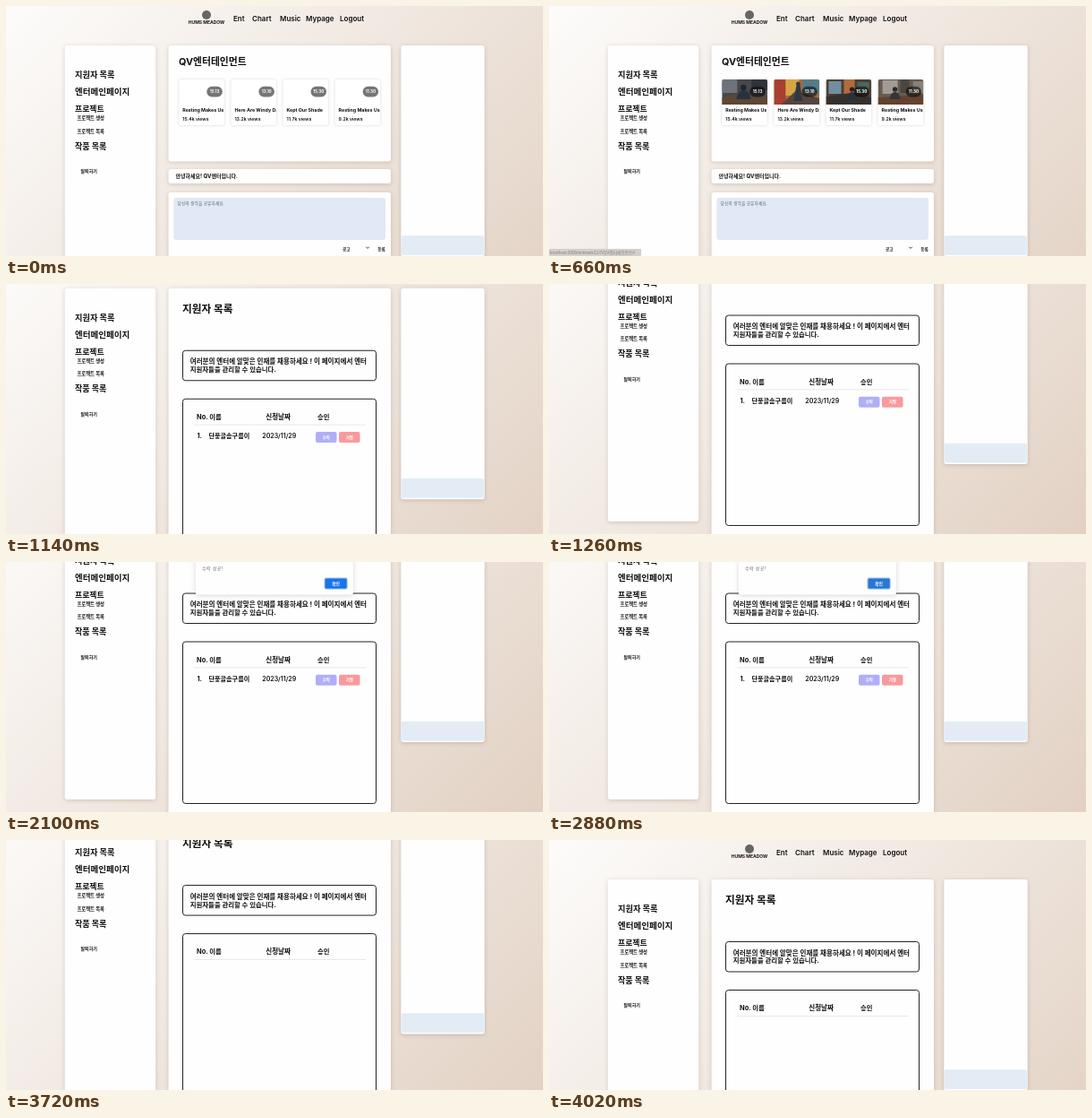
Write an HTML page that moves like this. It is 600x279 px and loops after 4.2 s.

```html
<!DOCTYPE html>
<html lang="ko">
<head>
<meta charset="utf-8">
<title>Applicants</title>
<style>
  html, body { margin: 0; width: 100%; height: 100%; overflow: hidden; background: #efe7e0; }
  svg { display: block; width: 100%; height: 100%; }
  text { font-family: Inter, 'Noto Sans CJK KR', 'Noto Sans CJK JP', sans-serif; font-weight: 700; fill: #111; white-space: pre; }
  .light { font-weight: 400; fill: #666; }
  .latin { font-weight: 600; }
  .white { fill: #fff; }
  .url { font-family: 'Liberation Sans', 'Noto Sans CJK KR', sans-serif; font-weight: 400; fill: #85827f; }
  .panel { fill: #fefefe; filter: drop-shadow(0 1px 2.5px rgba(70, 45, 25, .2)); }
  .card { fill: #fff; filter: drop-shadow(0 .5px 1.5px rgba(0, 0, 0, .16)); }
  .frame { fill: none; stroke: #222; stroke-width: 1; }
</style>
</head>
<body>
<svg id="stage" viewBox="0 0 600 279" preserveAspectRatio="none"></svg>
<script>
const LOOP = 4200, TICK = 60, SCROLL = 78.5, PAGE_H = 358;
const COMPANY = 'QV엔터테인먼트';

const rect = (x, y, w, h, fill, r = 0, extra = '') =>
  `<rect x="${x}" y="${y}" width="${w}" height="${h}" rx="${r}" ${fill ? `fill="${fill}"` : ''} ${extra}/>`;
const box = (cls, x, y, w, h, r = 3) => rect(x, y, w, h, '', r, `class="${cls}"`);
const circle = (x, y, r, fill) => `<circle cx="${x}" cy="${y}" r="${r}" fill="${fill}"/>`;
const path = (d, fill) => `<path d="${d}" fill="${fill}"/>`;
// y is the middle of the line
const text = (x, y, size, str, cls = '', extra = '') =>
  `<text x="${x}" y="${y + size * 0.36}" font-size="${size}" class="${cls}" ${extra}>${str}</text>`;
const centred = (x, y, size, str, cls) => text(x, y, size, str, cls, 'text-anchor="middle"');
const group = (id, body, extra = '') => `<g id="${id}" ${extra}>${body}</g>`;

// thumbnails, each 51 x 28
const scenes = [
  rect(0, 0, 51, 28, '#45474a') + rect(0, 0, 17, 15, '#6d7379') + rect(33, 0, 18, 12, '#30343a') +
    path('M0 28V20L22 15L51 19V28Z', '#5d4737') + circle(24, 9, 3.2, '#22262c') +
    path('M16 22Q18 12 24 12Q31 12 32 22Z', '#28323d'),
  rect(0, 0, 51, 28, '#a9683c') + rect(0, 0, 13, 28, '#a83f30') + rect(13, 0, 15, 18, '#d5a544') +
    rect(32, 0, 19, 16, '#567c8a') + path('M8 28L24 13L51 21V28Z', '#57443c') +
    path('M22 24L25 7L29 6L32 24Z', '#303943') + circle(27, 5, 2.4, '#303943'),
  rect(0, 0, 51, 28, '#4c4037') + rect(3, 2, 14, 14, '#718fa0') + rect(20, 0, 12, 16, '#b36b3c') +
    rect(35, 3, 13, 12, '#48695e') + path('M0 28V19L28 15L51 20V28Z', '#36312f') +
    circle(29, 11, 2.6, '#222') + path('M24 23Q25 14 29 14Q34 14 35 23Z', '#293238'),
  rect(0, 0, 51, 28, '#675b52') + rect(5, 1, 17, 15, '#a19b93') + rect(25, 0, 10, 15, '#4b4642') +
    rect(39, 2, 12, 13, '#87817a') + path('M0 28V20L51 17V28Z', '#64422f') +
    circle(19, 11, 2.7, '#2b2928') + path('M13 22Q14 14 19 14Q24 14 25 22Z', '#353638'),
];

const songs = [
  ['Resting Makes Us', '15.4k views', '15.13'],
  ['Here Are Windy Da', '13.2k views', '13.10'],
  ['Kept Our Shade', '11.7k views', '15.30'],
  ['Resting Makes Us', '9.2k views', '11.30'],
];

const songCard = ([title, views, length], i) => `<g transform="translate(${193.3 + 58.1 * i} 82)">` +
  box('card', 0, 0, 50.6, 51, 2) +
  `<g clip-path="url(#cardClip)"><g class="thumb">${scenes[i]}</g>` +
  rect(31, 7.8, 17.5, 11.6, 'rgba(0,0,0,.54)', 5.8) + centred(39.8, 13.7, 4.6, length, 'white') +
  text(4, 34, 5.3, title) + text(4, 44, 5.2, views, 'latin') + '</g></g>';

const nav = circle(224, 10, 5, '#666') + centred(224, 18.3, 5, 'HUMS MEADOW') +
  [[254, 'Ent'], [275, 'Chart'], [306, 'Music'], [335, 'Mypage'], [373, 'Logout']]
    .map(([x, s]) => text(x, 14, 8, s, 'latin')).join('');

const sidebar = box('panel', 65.7, 44, 101.5, 299.5) + [
  [77, 77, 9.2, '지원자 목록'], [77, 96, 9.5, '엔터메인페이지'], [77, 115, 8.9, '프로젝트'],
  [79.5, 125.3, 5.3, '프로젝트 생성'], [79.5, 139.6, 5.3, '프로젝트 목록'],
  [77, 156.3, 9, '작품 목록'], [83.5, 184.3, 5, '탈퇴하기'],
].map(a => text(...a)).join('');

const aside = box('panel', 441.3, 44, 93.4, 235.5) + rect(441.3, 256.3, 93.4, 21.7, '#e3ecf4', 3);

const home = box('panel', 181.5, 44, 248.5, 129.5) + text(193, 62.5, 10.8, COMPANY) +
  songs.map(songCard).join('') +
  box('panel', 181.5, 182, 248.5, 16) + text(189.5, 190, 6, '안녕하세요! QV엔터입니다.') +
  box('panel', 181.5, 208, 248.5, 90) + rect(187.3, 214, 236.7, 47, '#e1e9f6', 3) +
  text(191.5, 220.5, 4.8, '당신의 생각을 공유하세요.', 'light') +
  text(376, 271.5, 4.7, '공고') + text(415.3, 271.5, 4.7, '등록') +
  '<path d="M402.3 268.8l1.7 1.7l1.7-1.7" fill="none" stroke="#222" stroke-width=".9"/>';

const rowButton = (x, fill, label) =>
  rect(x, 204.3, 23.5, 12, fill, 2) + centred(x + 11.8, 210.3, 4.5, label, 'white');
const row = text(213.5, 209, 7.2, '1.') + text(226.5, 209, 7.1, '단풍골솜구름이') +
  text(286.3, 209, 7, '2023/11/29', 'latin') +
  rowButton(346, '#b1aef8', '수락') + rowButton(372, '#f89a9d', '거절');

const applicants = box('panel', 181.5, 44, 248.5, 330) + text(197, 67, 11.7, '지원자 목록') +
  box('frame', 197.5, 113.5, 216, 33.5) +
  text(205.7, 126, 7.55, '여러분의 엔터에 알맞은 인재를 채용하세요 ! 이 페이지에서 엔터') +
  text(205.7, 134.8, 7.4, '지원자들을 관리할 수 있습니다.') +
  box('frame', 197.5, 167.5, 216, 180.5) +
  text(213, 187.7, 7.4, 'No. 이름') + text(290.3, 187.7, 7.5, '신청날짜') + text(348, 187.7, 7.3, '승인') +
  rect(210, 196, 192, 0.8, '#e2e2e2') + group('row', row);

const dialog = box('panel', 211.8, -6, 176.2, 42.5, 2.5) +
  text(219, 7.7, 4.9, '수락 성공!', 'light', 'letter-spacing=".5"') +
  rect(355.6, 17.6, 26, 12.8, '#8db8ee', 2) +
  rect(356.6, 18.6, 24, 10.8, '#1a73e8', 1.5, 'id="confirm"') + centred(368.6, 24, 4.8, '확인', 'white');

const status = rect(0, 271, 103, 8, '#d4cfcb', 1, 'id="statusBox"') +
  text(1, 275, 4.7, '', 'url', 'id="statusUrl"');

document.getElementById('stage').innerHTML = `<defs>
  <linearGradient id="sky" gradientUnits="userSpaceOnUse" x1="60.5" y1="-60.5" x2="539.5" y2="418.5">
    <stop stop-color="#fdfcfb"/><stop offset="1" stop-color="#e2d1c3"/>
  </linearGradient>
  <clipPath id="cardClip"><rect width="50.6" height="51" rx="2"/></clipPath></defs>` +
  group('page', rect(0, 0, 600, PAGE_H, 'url(#sky)') + nav + sidebar + aside +
    group('home', home) + group('applicants', applicants)) +
  group('dialog', dialog) + group('status', status);

const $ = id => document.getElementById(id);
const thumbs = document.querySelectorAll('.thumb');

// [time, value] steps; the last one reached holds
const held = (steps, t) => steps.reduce((v, [at, next]) => t >= at ? next : v, 0);
const progress = (t, from, to) => Math.min(1, Math.max(0, (t - from) / (to - from)));
const smooth = p => p * p * (3 - 2 * p);

const fades = {
  dialog: [[1980, 0.5], [2040, 0.85], [2100, 1], [3060, 0.5], [3120, 0.15], [3180, 0]],
  status: [[480, 0.3], [540, 0.65], [600, 1], [1020, 0.8], [1080, 0.35], [1140, 0]],
  row: [[0, 1], [3300, 0.15], [3360, 0]],
  home: [[0, 1], [720, 0]],
  applicants: [[720, 1]],
};
const thumbFade = [[60, 0.6], [120, 0.9], [180, 1]];

function draw(t) {
  for (const id in fades) $(id).setAttribute('opacity', held(fades[id], t));
  thumbs.forEach(el => el.setAttribute('opacity', held(thumbFade, t)));

  const scroll = SCROLL * (smooth(progress(t, 1020, 1260)) - smooth(progress(t, 3600, 4020)));
  $('page').setAttribute('transform', `translate(0 ${-scroll})`);

  const hover = progress(t, 2400, 2880);
  $('confirm').setAttribute('fill', `rgb(${26 + 14 * hover},${115 + 4 * hover},${232 - 20 * hover})`);

  const moved = t >= 720;
  $('statusBox').setAttribute('width', moved ? 131 : 103);
  $('statusUrl').textContent = `localhost:3000/entmain/11/7/${COMPANY}${moved ? '/entapplicants' : '#'}`;
}

const start = performance.now();
function tick() {
  const t = (performance.now() - start) % LOOP;
  draw(Math.floor(t / TICK) * TICK);
  requestAnimationFrame(tick);
}
tick();
</script>
</body>
</html>
```
